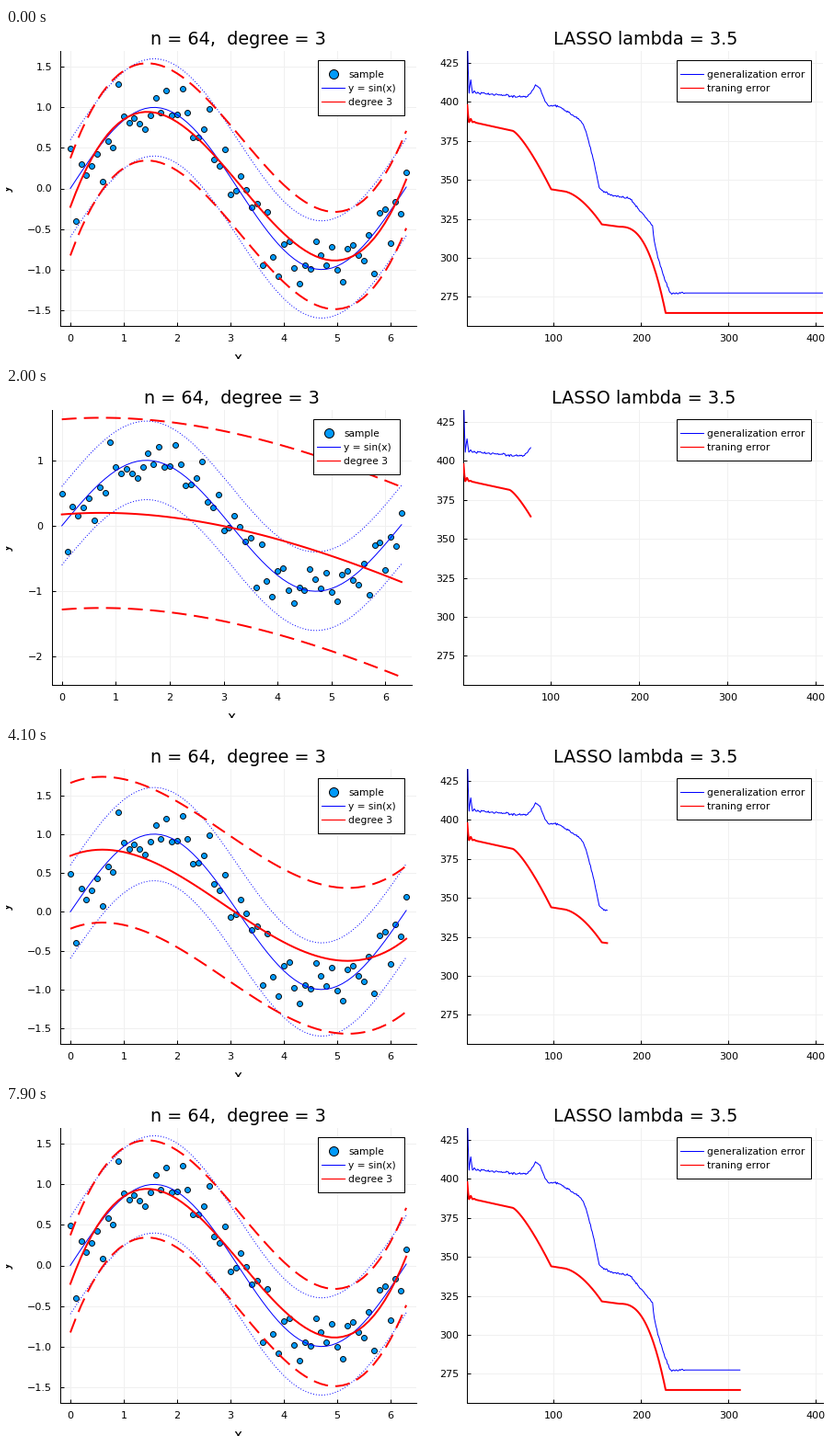
A matplotlib script for the animation above (8000 ms loop, 900x360 px).

```python
import numpy as np
import matplotlib.pyplot as plt
from matplotlib.animation import FuncAnimation
from matplotlib.patches import Rectangle
from matplotlib.transforms import Affine2D

W, H, DPI = 900, 360, 96
PX = 72 / DPI  # points per pixel
FRAMES, STEP, LAST = 80, 4, 409
TOP, BOTTOM = 25, 324

plt.rcParams.update({"font.family": "DejaVu Sans", "font.size": 8})
rng = np.random.default_rng(3)

# noisy sine samples
xs = np.arange(64) / 10
ys = np.sin(xs) + np.clip(rng.normal(0, .24, 64), -.5, .5)

# error curves over the iterations: a damped start, then a chain of eased drops
its = np.arange(1, LAST + 1)


def descend(level, kick, drops):
    t = its - 1
    curve = level + kick * np.exp(-t / 2.5) * (1 + np.cos(1.5 * t)) / 2
    for start, end, power, drop in drops:
        curve -= drop * np.clip((its - start) / (end - start), 0, 1) ** power
    return curve


train = descend(387, 11, [
    (8, 53, 1, 5.5), (53, 97, 1.3, 37.5), (97, 110, 1, 1.2),
    (110, 155, 1.7, 21.3), (155, 175, 1, 1.5), (175, 228, 2.6, 55.3)])
general = descend(405.5, 44, [
    (20, 66, 1, 2.5), (84, 94, 1, 5.5), (104, 130, 1, 9), (130, 152, 1.45, 43.5),
    (152, 165, .8, 4.5), (165, 187, 1, 2.5), (187, 213, 1, 17.5), (213, 233, .65, 43)])
general += 7.5 * np.exp(-((its - 80.5) / 7) ** 2)
general += rng.normal(0, .35, LAST) * ((its > 12) & (its < 250))

# stages of the fit: iteration -> values at four nodes, then sigma
nodes = [0, 2.1, 4.2, 6.3]
stage_it = [1, 53, 97, 161, 197, 236]
stage_fit = np.array([
    [0, 0, 0, 0, 2.95],
    [.017, .074, -.149, -1.0, 1.9],
    [.33, .169, -.356, -.718, 1.006],
    [.72, .4425, -.458, -.347, .938],
    [.632, .483, -.50, -.33, .888],
    [-.2275, .7756, -.67, .11, .6]])


def fit_at(it):
    """Mean curve and sigma; progress follows both time and the training error."""
    it = min(it, stage_it[-1] - 1)
    i = np.searchsorted(stage_it, it, side="right") - 1
    a, b = stage_it[i], stage_it[i + 1]
    t = (it - a) / (b - 1 - a if b == stage_it[-1] else b - a)
    if i:
        ea, eb = train[a - 1], train[b - 1]
        t = (t + (train[it - 1] - ea) / (eb - ea)) / 2
    fit = stage_fit[i] * (1 - t) + stage_fit[i + 1] * t
    return np.polyval(np.polyfit(nodes, fit[:4], 3), xs), fit[4]


fig = plt.figure(figsize=(W / DPI, H / DPI), dpi=DPI, facecolor="white")


def make_axes():
    ax = fig.add_axes([.1, .1, .3, .8])
    ax.spines[["top", "right"]].set_visible(False)
    ax.spines[["left", "bottom"]].set_linewidth(PX)
    ax.tick_params(direction="in", length=4 * PX, width=PX, pad=9 * PX, labelsize=8.3)
    ax.grid(color="#f0f0f0", lw=PX)
    ax.set_axisbelow(True)
    return ax


def place(ax, left, right):
    ax.set_position([left / W, 1 - BOTTOM / H, (right - left) / W, (BOTTOM - TOP) / H])


def line(ax, x, y, color, width, style="-"):
    return ax.plot(x, y, color=color, lw=width * PX, ls=style, zorder=3,
                   dash_capstyle="butt")[0]


DOT, DASH = (0, (1, 2)), (0, (8, 4))
fit_ax, err_ax = make_axes(), make_axes()

fit_ax.plot(xs, ys, "o", ms=6 * PX, mfc="#009afa", mec="black", mew=.9 * PX, zorder=2.5)
line(fit_ax, xs, np.sin(xs), "blue", 1)
for d in (-.6, .6):
    line(fit_ax, xs, np.sin(xs) + d, "blue", 1, DOT)
mean = line(fit_ax, xs, ys, "red", 2)
upper = line(fit_ax, xs, ys, "red", 2, DASH)
lower = line(fit_ax, xs, ys, "red", 2, DASH)
fit_ax.set_xlim(-.189, 6.489)
fit_ax.set_xticks(range(7))

gen_line = line(err_ax, [], [], "blue", 1)
train_line = line(err_ax, [], [], "red", 2)
err_ax.set_xlim(1, 408)
err_ax.set_ylim(256.4, 432.7)
err_ax.set_xticks(range(100, 401, 100))
err_ax.set_yticks(range(275, 426, 25))

# overlay in pixel coordinates: titles, axis names and legends
ui = fig.add_axes([0, 0, 1, 1], zorder=5)
ui.set(xlim=(0, W), ylim=(H, 0))
ui.axis("off")
fit_title = ui.text(0, 18, "n = 64,  degree = 3", size=14.3, ha="center")
err_title = ui.text(0, 18, "LASSO lambda = 3.5", size=14.3, ha="center")
x_name = ui.text(0, 364, "x", size=11.3, ha="center")
ui.text(5, 174.5, "y", size=11.3, ha="center", rotation=90, rotation_mode="anchor")

shift = Affine2D()
moved = shift + ui.transData


def legend(x, w, h, rows, tr):
    ui.add_patch(Rectangle((x, 34.5), w, h, fc="white", ec="black", lw=PX, transform=tr))
    for i, (label, color, width) in enumerate(rows):
        y = 49.5 + 15.2 * i
        if width:
            ui.plot([x + 4.5, x + 29.5], [y, y], color=color, lw=width * PX, transform=tr)
        else:
            ui.plot([x + 17], [y], "o", ms=10 * PX, mfc=color, mec="black",
                    mew=PX, transform=tr)
        ui.text(x + 33.8, y + 4, label, transform=tr)


legend(338.5, 94, 60, [("sample", "#009afa", 0), ("y = sin(x)", "blue", 1),
                       ("degree 3", "red", 1.2)], moved)
legend(728.5, 146, 45, [("generalization error", "blue", 1),
                        ("traning error", "red", 1.2)], ui.transData)


def update(k):
    it = 1 + STEP * (k - 1) if k else LAST
    m, sigma = fit_at(it)
    mean.set_ydata(m)
    upper.set_ydata(m + sigma)
    lower.set_ydata(m - sigma)
    gen_line.set_data(its[:it], general[:it])
    train_line.set_data(its[:it], train[:it])

    lo, hi = min(-1.6, (m - sigma).min()), max(1.6, (m + sigma).max())
    pad = .03 * (hi - lo)
    lo, hi = lo - pad, hi + pad
    fine = lo > -2
    step = .5 if fine else 1
    ticks = np.arange(np.ceil(lo / step), np.floor(hi / step) + 1) * step + 0.0
    labels = [f"{v:.{int(fine)}f}".replace("-", "\u2212") for v in ticks]
    fit_ax.set_ylim(lo, hi)
    fit_ax.set_yticks(ticks, labels)

    # wider tick labels push the panels to the right
    l1, r1, l2 = (59, 446, 501.4) if fine else (49.6, 441, 497.3)
    place(fit_ax, l1, r1)
    place(err_ax, l2, 888)
    fit_title.set_x((l1 + r1) / 2)
    x_name.set_x((l1 + r1) / 2)
    err_title.set_x((l2 + 888) / 2)
    shift.clear().translate(r1 - 446, 0)
    return []


anim = FuncAnimation(fig, update, frames=FRAMES, interval=100, repeat=True)
plt.show()
```
